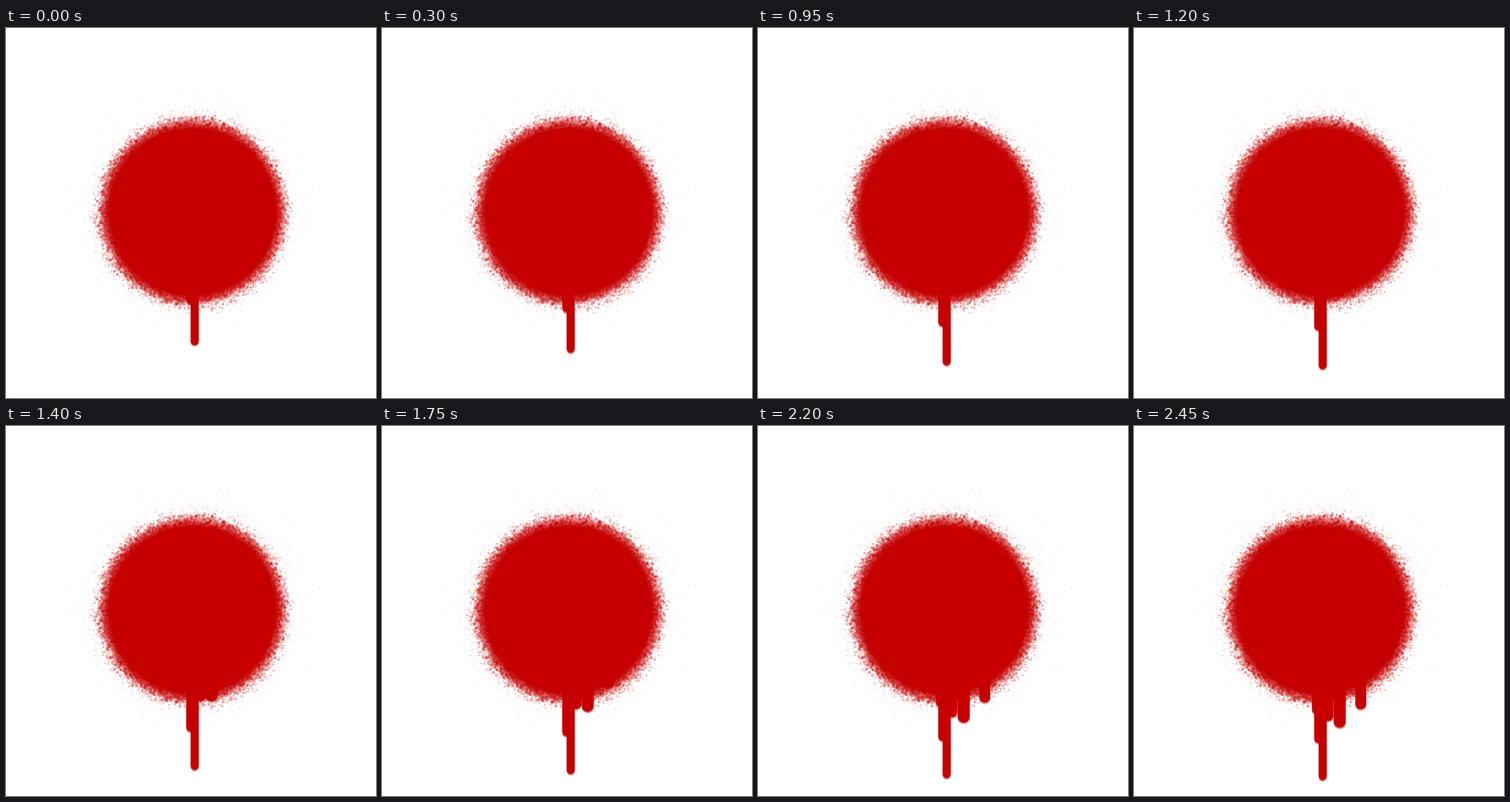
These frames come from a looping animation (500x500 px, 2500 ms). An HTML page with a canvas:

```html
<!DOCTYPE html>
<html lang="en">
<head>
<meta charset="utf-8">
<title>Spray paint</title>
<style>
html, body { margin: 0; width: 100%; height: 100%; overflow: hidden; background: #fff; }
canvas { display: block; width: 500px; height: 500px; }
</style>
</head>
<body>
<canvas id="stage" width="500" height="500"></canvas>
<script>
const LOOP = 2500, STEP = 50, SLOWING = 1850;
const RED = '#c60000', CX = 252, CY = 248.5;

// Each drip runs from y, slowing down towards y + run
const drips = [
  { x: 255, w: 11, start: 0, y: 430, run: 68 },
  { x: 249.5, w: 12, start: 0, y: 374, run: 76 },
  { x: 278, w: 16.5, start: 1050, y: 356, run: 100 },
  { x: 262.5, w: 14, start: 1200, y: 366, run: 69 },
  { x: 306.5, w: 15, start: 1600, y: 348, run: 98 },
  { x: 245.5, w: 10, start: 1900, y: 366, run: 93 }
];

let seed = 90210;
function rand() {
  seed = (seed + 0x6D2B79F5) | 0;
  let n = Math.imul(seed ^ (seed >>> 15), 1 | seed);
  n = (n + Math.imul(n ^ (n >>> 7), 61 | n)) ^ n;
  return ((n ^ (n >>> 14)) >>> 0) / 4294967296;
}

function gauss() {
  return Math.sqrt(-2 * Math.log(1 - rand())) * Math.cos(2 * Math.PI * rand());
}

function makeDot(dist, r, alpha) {
  const a = rand() * Math.PI * 2;
  return { x: CX + dist * Math.cos(a), y: CY + dist * Math.sin(a), r, alpha };
}

function edgeDot() {
  const dist = 109 + Math.abs(gauss()) * 11.5;
  const far = Math.max(0, dist - 127) / 24;
  return makeDot(dist, Math.max(0.45, (0.9 + rand() * 1.4) * (1 - far)), 0.12 + rand() * 0.2);
}

function mistDot() {
  const dist = Math.min(174, 124 - Math.log(1 - rand()) * 11);
  return makeDot(dist, 0.3 + rand() * 0.45, 0.1 + rand() * 0.18);
}

function dots(edge, mist) {
  return [...Array.from({ length: edge }, edgeDot), ...Array.from({ length: mist }, mistDot)];
}

function disc(c, { x, y, r, alpha }) {
  c.globalAlpha = alpha;
  c.beginPath();
  c.arc(x, y, r, 0, Math.PI * 2);
  c.fill();
}

function drawDots(c, list) {
  for (const d of list) disc(c, d);
}

function makeBlot() {
  const layer = document.createElement('canvas');
  layer.width = layer.height = 500;
  const c = layer.getContext('2d');
  const soft = c.createRadialGradient(CX, CY, 112, CX, CY, 127);
  soft.addColorStop(0, RED);
  soft.addColorStop(0.45, RED + '88');
  soft.addColorStop(1, RED + '00');
  c.fillStyle = soft;
  disc(c, { x: CX, y: CY, r: 127, alpha: 1 });
  c.fillStyle = RED;
  drawDots(c, dots(6800, 900));
  return layer;
}

const blot = makeBlot();
// Fresh paint added at each step
const fresh = Array.from({ length: LOOP / STEP }, () => dots(20, 5));
const ctx = document.getElementById('stage').getContext('2d');

function strip(x, w, tip, alpha) {
  const r = w / 2, top = Math.min(340, tip - w);
  ctx.globalAlpha = alpha;
  ctx.beginPath();
  ctx.moveTo(x - r, top);
  ctx.lineTo(x - r, tip - r);
  ctx.arc(x, tip - r, r, Math.PI, 0, true);
  ctx.lineTo(x + r, top);
  ctx.fill();
}

function drawDrip({ x, w, start, y, run }, t) {
  if (t < start) return;
  const tip = y + run * (1 - Math.exp((start - t) / SLOWING));
  strip(x, w, tip + 0.6, 0.4);
  strip(x, w, tip - 0.6, 0.5);
  strip(x, w - 0.4, tip - 1.8, 1);
}

function draw(step) {
  ctx.globalAlpha = 1;
  ctx.fillStyle = '#fff';
  ctx.fillRect(0, 0, 500, 500);
  ctx.drawImage(blot, 0, 0);
  ctx.fillStyle = RED;
  for (let i = 1; i <= step; i++) drawDots(ctx, fresh[i]);
  for (const d of drips) drawDrip(d, step * STEP);
}

const start = performance.now();
let shown = 0;
draw(0);

function tick() {
  const step = Math.floor(((performance.now() - start) % LOOP) / STEP);
  if (step !== shown) draw(shown = step);
  requestAnimationFrame(tick);
}
requestAnimationFrame(tick);
</script>
</body>
</html>
```
